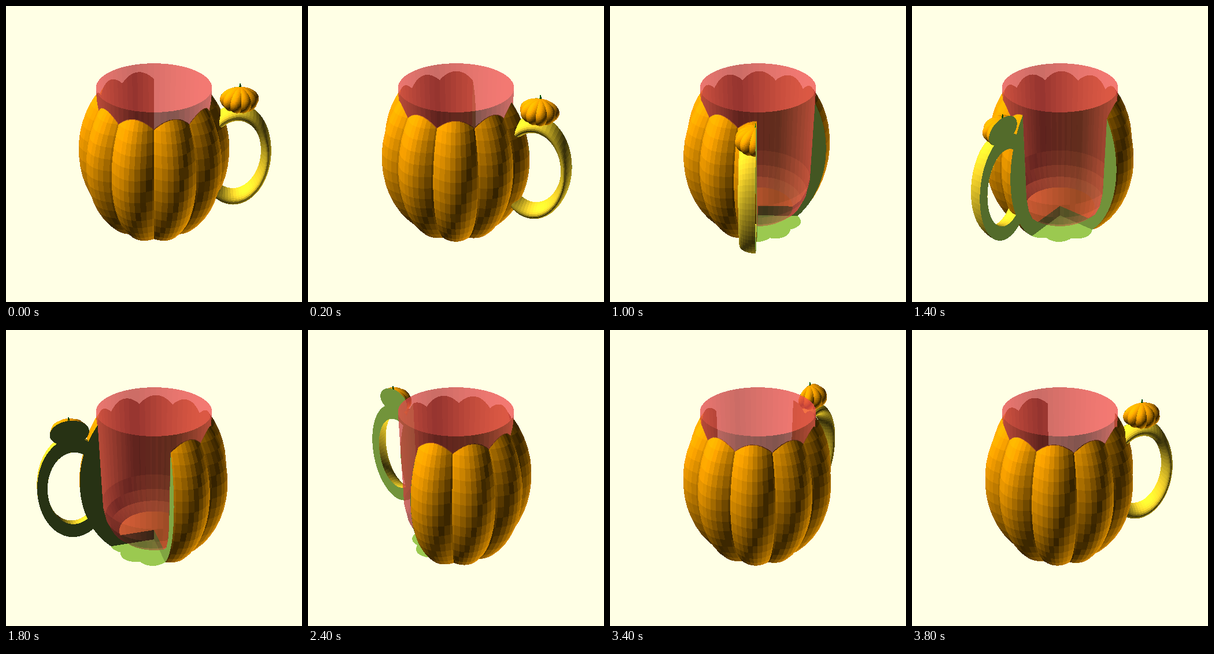
These frames come from a looping animation (512 px wide and 512 px high, 4 s). An HTML page with a canvas:

```html
<!DOCTYPE html>
<html lang="en">
<head>
<meta charset="utf-8">
<title>Pumpkin mug</title>
<style>
  html, body { margin: 0; width: 100%; height: 100%; overflow: hidden; background: #ffffe5; }
  canvas { display: block; width: 512px; height: 512px; }
</style>
</head>
<body>
<canvas id="stage" width="512" height="512"></canvas>
<script>
const SIZE = 512, MID = 256, FOCAL = 1287, DIST = 500;
const STEPS = 20, STEP_MS = 200, TURN = -365 / STEPS;
const SIN = 0.5, COS = Math.sqrt(3) / 2;
const TAU = Math.PI * 2;

const ORANGE = [255, 165, 0], YELLOW = [249, 215, 44], STEM = [0, 128, 0];
const CUT = [157, 203, 81], GLASS = [255, 81, 81];
const WALL = [190, 150, 50], FLOOR = [255, 133, 56];

// ---- shapes (millimetres, z up, handle along +x) ----
function pumpkin(a, t, b, ox, oz) {
  return [0, 1, 2, 3, 4].map(k => {
    const r = k * TAU / 10;
    return { cos: Math.cos(r), sin: Math.sin(r), a, t, b, ox, oz };
  });
}
const body = pumpkin(50.5, 27.3, 64, 0, 50.5);
const mini = pumpkin(12.5, 6.75, 8.6, 55, 91);

const ring = { x: 54.3, z: 50, squash: 0.64, major: 32.4, minor: 5.2, depth: 10 };
const cup = [[0, 8], [24.3, 8], [30, 13.5], [33.5, 21.5], [35.5, 32.5], [37, 100], [0, 100]];

function inLobe(l, x, y, z) {
  const dx = x - l.ox;
  const u = (dx * l.cos + y * l.sin) / l.a;
  const v = (y * l.cos - dx * l.sin) / l.t;
  const w = (z - l.oz) / l.b;
  return u * u + v * v + w * w < 1;
}
function inBody(x, y, z) {
  return body.some(l => inLobe(l, x, y, z));
}
function inRing(x, y, z) {
  const q = Math.hypot((x - ring.x) / ring.squash, z - ring.z) - ring.major;
  return (q / ring.minor) ** 2 + (y / ring.depth) ** 2 < 1;
}
function inSolid(x, y, z) {
  return inBody(x, y, z) || inRing(x, y, z) || mini.some(l => inLobe(l, x, y, z));
}
// The hollow stays open above the rim.
function inCup(x, y, z) {
  if (z < 8) return false;
  let i = 2;
  while (i < 5 && z > cup[i][1]) i++;
  const [r0, z0] = cup[i - 1], [r1, z1] = cup[i];
  const r = r0 + (r1 - r0) * Math.min(1, (z - z0) / (z1 - z0));
  return x * x + y * y < r * r;
}
const cutAway = (x, y) => x > 0 && y > 0;
const outer = (x, y, z) => z >= 0 && !cutAway(x, y) && !inCup(x, y, z);
const cap = (x, y, z) => z >= 0 && !inCup(x, y, z) && inSolid(x, y, z);
const cavity = (x, y, z) => !cutAway(x, y) && inBody(x, y, z);

// ---- meshes ----
function grid(nu, nv, at) {
  const quads = [];
  for (let i = 0; i < nu; i++)
    for (let j = 0; j < nv; j++)
      quads.push([at(i / nu, j / nv), at((i + 1) / nu, j / nv),
                  at((i + 1) / nu, (j + 1) / nv), at(i / nu, (j + 1) / nv)]);
  return quads;
}
// Rings sit half a step away from the poles.
function lobeMesh(l) {
  return grid(50, 24, (u, v) => {
    const polar = (v * 24 + 0.5) / 25 * Math.PI, s = Math.sin(polar);
    const p = l.a * s * Math.cos(u * TAU), q = l.t * s * Math.sin(u * TAU);
    return [l.ox + p * l.cos - q * l.sin, p * l.sin + q * l.cos, l.oz + l.b * Math.cos(polar)];
  });
}
function lathe(points, n, ox = 0) {
  return grid(n, points.length - 1, (u, v) => {
    const [r, z] = points[Math.round(v * (points.length - 1))];
    return [ox + r * Math.cos(u * TAU), r * Math.sin(u * TAU), z];
  });
}
const ringMesh = grid(60, 30, (u, v) => {
  const r = ring.major + ring.minor * Math.cos(v * TAU);
  return [ring.x + ring.squash * r * Math.cos(u * TAU), ring.depth * Math.sin(v * TAU),
          ring.z + r * Math.sin(u * TAU)];
});

// Facet with a unit normal taken from its diagonals.
function facet(p) {
  const d = (a, b) => [0, 1, 2].map(i => p[b][i] - p[a][i]);
  const a = d(0, 2), b = d(1, 3);
  const n = [a[1] * b[2] - a[2] * b[1], a[2] * b[0] - a[0] * b[2], a[0] * b[1] - a[1] * b[0]];
  const len = Math.hypot(...n) || 1;
  return { p, n: n.map(v => v / len) };
}
const part = (quads, color, keep) => ({ facets: quads.map(facet), color, keep });

const parts = [
  part(body.flatMap(lobeMesh), ORANGE, outer),
  part(ringMesh, YELLOW, outer),
  part(mini.flatMap(lobeMesh), ORANGE, outer),
  part(lathe([[1.1, 98], [0.6, 100], [0.3, 102], [0, 102]], 8, 55), STEM, outer),
  part(lathe(cup.slice(0, 2), 60), FLOOR, cavity),
  part(lathe(cup.slice(1, 6), 60), WALL, cavity),
  part([[[0, 0, 0], [84, 0, 0], [84, 0, 106], [0, 0, 106]]], CUT, cap),
  part([[[0, 0, 0], [0, 60, 0], [0, 60, 106], [0, 0, 106]]], CUT, cap),
  part([[[0, 0, 0], [60, 0, 0], [60, 60, 0], [0, 60, 0]]], CUT, inBody)
];
const glass = part(lathe(cup.slice(1), 60), GLASS, null);

// ---- renderer ----
const ctx = document.getElementById("stage").getContext("2d");
const depth = new Float32Array(SIZE * SIZE);

function render(step) {
  const image = ctx.createImageData(SIZE, SIZE), px = image.data;
  const turn = step * TURN * Math.PI / 180, c = Math.cos(turn), s = Math.sin(turn);
  depth.fill(0);
  for (let i = 0; i < px.length; i += 4) {
    px[i] = px[i + 1] = px[i + 3] = 255;
    px[i + 2] = 229;
  }

  function project([X, Y, Z]) {
    const x = X * c - Y * s, y = X * s + Y * c, z = Z - 50;
    const w = DIST - SIN * z + COS * y;
    return [MID + FOCAL * x / w, MID - FOCAL * (COS * z + SIN * y) / w, 1 / w];
  }
  function shade(n) {
    const nx = n[0] * c - n[1] * s, ny = n[0] * s + n[1] * c;
    return 0.2 + Math.abs(-nx + (SIN - COS) * ny + (SIN + COS) * n[2]) / Math.sqrt(3);
  }
  function visible(keep, i, j, inv) {
    const w = 1 / inv;
    const x = (i + 0.5 - MID) * w / FOCAL, up = (MID - j - 0.5) * w / FOCAL, near = DIST - w;
    const y = SIN * up - COS * near, z = COS * up + SIN * near;
    return keep(x * c + y * s, y * c - x * s, z + 50);
  }
  function triangle(a, b, d, rgb, keep) {
    const area = (b[0] - a[0]) * (d[1] - a[1]) - (b[1] - a[1]) * (d[0] - a[0]);
    if (Math.abs(area) < 1e-6) return;
    const x0 = Math.max(0, Math.ceil(Math.min(a[0], b[0], d[0]) - 0.5));
    const x1 = Math.min(SIZE - 1, Math.floor(Math.max(a[0], b[0], d[0]) - 0.5));
    const y0 = Math.max(0, Math.ceil(Math.min(a[1], b[1], d[1]) - 0.5));
    const y1 = Math.min(SIZE - 1, Math.floor(Math.max(a[1], b[1], d[1]) - 0.5));
    for (let j = y0; j <= y1; j++) {
      for (let i = x0; i <= x1; i++) {
        const dx = i + 0.5 - a[0], dy = j + 0.5 - a[1];
        const v = (dx * (d[1] - a[1]) - dy * (d[0] - a[0])) / area;
        const w = (dy * (b[0] - a[0]) - dx * (b[1] - a[1])) / area;
        if (v < 0 || w < 0 || v + w > 1) continue;
        const inv = a[2] + v * (b[2] - a[2]) + w * (d[2] - a[2]);
        const at = j * SIZE + i, o = at * 4;
        if (keep) {
          if (inv <= depth[at] || !visible(keep, i, j, inv)) continue;
          depth[at] = inv;
          for (let k = 0; k < 3; k++) px[o + k] = rgb[k];
        } else if (inv * 1.0006 >= depth[at]) {
          for (let k = 0; k < 3; k++) px[o + k] = (px[o + k] + rgb[k]) / 2;
        }
      }
    }
  }
  function paint(item, side) {
    for (const f of item.facets) {
      const q = f.p.map(project);
      if (side) {
        const winding = (q[2][0] - q[0][0]) * (q[3][1] - q[1][1]) - (q[2][1] - q[0][1]) * (q[3][0] - q[1][0]);
        if (winding * side <= 0) continue;
      }
      const light = shade(f.n), rgb = item.color.map(v => Math.min(255, v * light));
      triangle(q[0], q[1], q[2], rgb, item.keep);
      triangle(q[0], q[2], q[3], rgb, item.keep);
    }
  }

  parts.forEach(p => paint(p));
  paint(glass, 1);    // far side of the glass
  paint(glass, -1);   // near side
  return image;
}

const cache = [];
let shown = -1;
function tick() {
  const step = Math.floor(performance.now() / STEP_MS) % STEPS;
  if (step !== shown) {
    cache[step] = cache[step] || render(step);
    ctx.putImageData(cache[step], 0, 0);
    shown = step;
  }
  requestAnimationFrame(tick);
}
tick();
</script>
</body>
</html>
```
